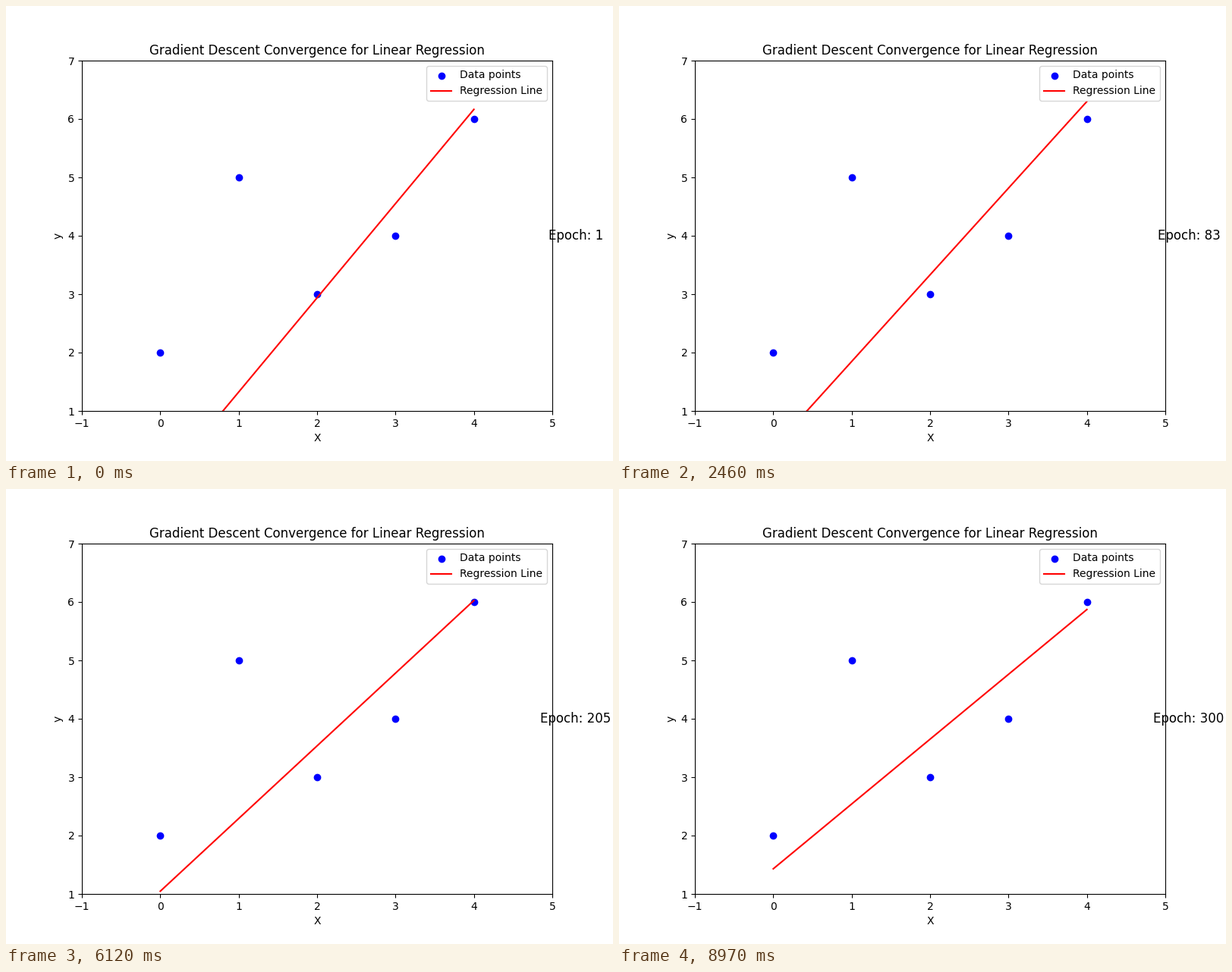
These frames come from a looping animation (800 by 600 pixels, 9 s). A matplotlib script:

```python
import numpy as np
import matplotlib.pyplot as plt
from matplotlib.animation import FuncAnimation

EPOCHS = 300
RATE = 0.01

X = np.arange(5)
y = np.array([2, 5, 3, 4, 6])


def descend(slope, intercept):
    """Return the (slope, intercept) pair reached after each epoch."""
    history = []
    for _ in range(EPOCHS):
        error = slope * X + intercept - y
        slope -= RATE * np.mean(error * X)
        intercept -= RATE * np.mean(error)
        history.append((slope, intercept))
    return history


history = descend(1.61, -0.3)

fig, ax = plt.subplots(figsize=(8, 6), dpi=100)
ax.scatter(X, y, color="blue", label="Data points")
line, = ax.plot(X, y, color="red", label="Regression Line")
counter = ax.text(1.05, 0.5, "", transform=ax.transAxes, fontsize=12,
                  ha="center", va="center")

ax.set_xlim(-1, 5)
ax.set_ylim(1, 7)
ax.set_xlabel("X")
ax.set_ylabel("y")
ax.set_title("Gradient Descent Convergence for Linear Regression")
ax.legend(loc="best")


def update(frame):
    slope, intercept = history[frame]
    line.set_ydata(slope * X + intercept)
    counter.set_text(f"Epoch: {frame + 1}")
    return line, counter


ani = FuncAnimation(fig, update, frames=EPOCHS, interval=30,
                    repeat=True, repeat_delay=0, blit=False)
plt.show()
```
